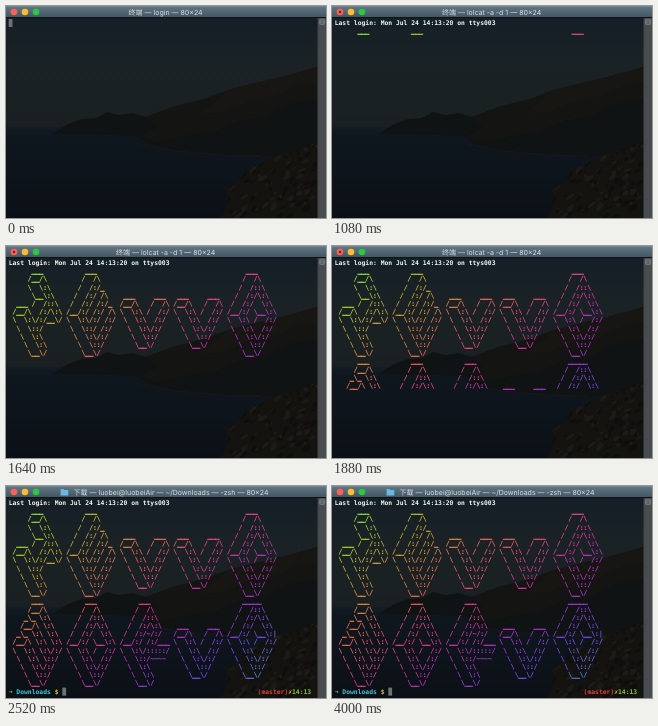
An HTML page for the animation above (4480 ms loop, 320 px wide and 212 px high).

```html
<!DOCTYPE html>
<html lang="zh">
<head>
<meta charset="utf-8">
<title>Terminal</title>
<style>
  html, body { margin: 0; width: 100%; height: 100%; overflow: hidden; background: #0d1218; }
  svg { display: block; width: 100%; height: 100%; }
  text { white-space: pre; text-rendering: geometricPrecision; }
  .mono { font: bold 6.36px "DejaVu Sans Mono", monospace; }
  .art { font-size: 7.1px; text-anchor: middle; }
  .title { font: 7px Inter, "Noto Sans CJK SC", "Noto Sans CJK", sans-serif; fill: #dce1e4; text-anchor: middle; }
</style>
</head>
<body>
<svg viewBox="0 0 320 212">
  <defs>
    <linearGradient id="sky" x2="0" y2="1">
      <stop offset="0" stop-color="#141f26"/>
      <stop offset=".4" stop-color="#1a2225"/>
      <stop offset="1" stop-color="#1a2022"/>
    </linearGradient>
    <linearGradient id="sea" x2="0" y2="1">
      <stop offset="0" stop-color="#131d25"/>
      <stop offset=".1" stop-color="#0f171e"/>
      <stop offset="1" stop-color="#0b1016"/>
    </linearGradient>
    <linearGradient id="bar" x2="0" y2="1">
      <stop offset="0" stop-color="#617786"/>
      <stop offset="1" stop-color="#435561"/>
    </linearGradient>
    <clipPath id="rock">
      <path d="M216 212 222 196 220 184 233 174 240 164 252 160 265 151 286 146 300 139 312 136V212Z"/>
    </clipPath>
  </defs>

  <g id="desktop">
    <rect y="11" width="320" height="111" fill="url(#sky)"/>
    <rect y="121" width="320" height="91" fill="url(#sea)"/>
    <path d="M46 128 62 118 76 113 90 112 101 106 112 109 127 107 140 111 166 101 198 93 222 84 250 77 276 71 312 61V152L262 150 215 149 170 145 142 138 134 131 108 129Z" fill="#101313"/>
    <path d="M140 111 166 101 198 93 222 84 250 77 276 71 312 61V92L280 99 256 111 232 115 206 126 178 130 150 136 134 131 152 121Z" fill="#141513"/>
    <path d="M222 84 250 77 276 71 312 61V76L290 80 268 91 240 96 216 106 194 108Z" fill="#171613"/>
    <path d="M136 138 170 145 215 149 255 150" fill="none" stroke="#1a1814" stroke-width="1.2"/>
    <g id="boulder" clip-path="url(#rock)">
      <rect x="210" y="130" width="102" height="82" fill="#151310"/>
    </g>
  </g>

  <rect x="311.5" y="12" width="8.5" height="200" fill="#484c4e"/>
  <rect x="311.5" y="12" width=".6" height="200" fill="#2d3133"/>
  <path d="M313.8 13.8h4.4v4.4h-4.4ZM313.8 16h4.4" fill="none" stroke="#a5a9ab" stroke-width=".6"/>

  <rect width="320" height="11.4" fill="url(#bar)"/>
  <rect width="320" height=".6" fill="#8296a2"/>
  <rect y="11.1" width="320" height=".9" fill="#0c1115"/>
  <circle cx="8" cy="6" r="3.3" fill="#ff5f57"/>
  <circle id="busy" cx="8" cy="6" r="1.2" fill="#7d1712"/>
  <circle cx="19" cy="6" r="3.3" fill="#ffbd2e"/>
  <circle cx="30" cy="6" r="3.3" fill="#28c840"/>
  <path id="folder" d="M54.6 3h2.8l.8 1H62.3v5.4H54.6Z" fill="#67b8e2"/>
  <text id="title" class="title" y="8.6"></text>

  <g id="screen" class="mono">
    <rect id="cursor" width="3.8" height="8" fill="#6c7274"/>
  </g>
</svg>

<script>
const LOOP = 4480;
const CELL = { w: 3.829, h: 8.2, x: 2.7, y: 19 };
const ART_START = 1080, LINE_MS = 55;
const PROMPT_AT = 2480;

const $ = id => document.getElementById(id);
const raw = s => String.raw(s).split('\n').slice(1);

const FONT = {
  H: raw`
      ___
     /__/\
     \  \:\
      \__\:\
  ___ /  /::\
 /__/\  /:/\:\
 \  \:\/:/__\/
  \  \::/
   \  \:\
    \  \:\
     \__\/`,
  E: raw`
      ___
     /  /\
    /  /:/_
   /  /:/ /\
  /  /:/ /:/_
 /__/:/ /:/ /\
 \  \:\/:/ /:/
  \  \::/ /:/
   \  \:\/:/
    \  \::/
     \__\/`,
  L: raw`



  ___     ___
 /__/\   /  /\
 \  \:\ /  /:/
  \  \:\  /:/
   \  \:\/:/
    \  \::/
     \__\/
`,
  O: raw`
      ___
     /  /\
    /  /::\
   /  /:/\:\
  /  /:/  \:\
 /__/:/ \__\:\
 \  \:\ /  /:/
  \  \:\  /:/
   \  \:\/:/
    \  \::/
     \__\/`,
  W: raw`
      ___
     /__/\
    _\_ \:\
   /__/\ \:\
  _\_ \:\ \:\
 /__/\ \:\ \:\
 \  \:\ \:\/:/
  \  \:\ \::/
   \  \:\/:/
    \  \::/
     \__\/`,
  R: raw`
      ___
     /  /\
    /  /::\
   /  /:/\:\
  /  /:/~/:/
 /__/:/ /:/___
 \  \:\/:::::/
  \  \::/~~~~
   \  \:\
    \  \:\
     \__\/`,
  D: raw`
     _____
    /  /::\
   /  /:/\:\
  /  /:/  \:\
 /__/:/ \__\:|
 \  \:\ /  /:/
  \  \:\  /:/
   \  \:\/:/
    \  \::/
     \__\/
`
};

const banner = word => Array.from({ length: 11 }, (_, i) =>
  [...word].map(c => FONT[c][i].padEnd(14)).join(''));

function add(parent, name, attrs, content = '') {
  const el = document.createElementNS('http://www.w3.org/2000/svg', name);
  for (const k in attrs) el.setAttribute(k, attrs[k]);
  el.textContent = content;
  parent.appendChild(el);
  return el;
}

const colX = col => CELL.x + col * CELL.w;
const rowY = row => CELL.y + row * CELL.h;

function print(parent, row, col, str, fill) {
  return add(parent, 'text', { x: colX(col), y: rowY(row), fill }, str);
}

// Soft sine rainbow running along columns and down rows.
function rainbow(row, col) {
  const phase = -0.2 + 0.1 * (row + col / 3);
  const rgb = [0, 1, 2].map(i =>
    Math.round(Math.sin(phase + i * 2 * Math.PI / 3) * 100 + 152));
  return `rgb(${rgb})`;
}

// Rough light and dark flecks on the boulder.
let seed = 7;
const rand = () => (seed = seed * 16807 % 2147483647) / 2147483647;
for (let i = 0; i < 150; i++) {
  const x = 214 + rand() * 98, y = 134 + rand() * 78;
  add($('boulder'), 'ellipse', {
    rx: 1 + rand() * 4, ry: 0.6 + rand() * 1.6,
    fill: rand() < 0.5 ? '#1e1b16' : '#0e0e0c',
    transform: `translate(${x} ${y}) rotate(${-20 - rand() * 40})`
  });
}

const screen = $('screen');
const login = print(screen, 0, 0, 'Last login: Mon Jul 24 14:13:20 on ttys003', '#f4f6f6');

const lines = [...banner('HELLO'), ...banner('WORLD')].map((line, row) => {
  const g = add(screen, 'g', { class: 'art' });
  [...line].forEach((c, col) => {
    if (c === ' ') return;
    const fill = rainbow(row, col);
    const el = print(g, row + 1, col + 0.5, c, fill);
    if (c === '_') {
      el.setAttribute('stroke', fill);
      el.setAttribute('stroke-width', 0.3);
    }
  });
  return g;
});

const prompt = add(screen, 'g', {});
[
  [0, '➜', '#5fc46a'], [2, 'Downloads', '#45c4d6'], [12, '$', '#d0bd3c'],
  [65, '(master)', '#d8433a'], [73, '✗', '#d9c83c'], [74, '14:13', '#86c23c']
].forEach(([col, str, fill]) => print(prompt, 23, col, str, fill));

const TITLES = [
  [0, '终端 — login — 80×24'],
  [600, '终端 — -zsh — 80×24'],
  [720, '终端 — lolcat -a -d 1 — 80×24'],
  [2320, '终端 — -zsh — 80×24'],
  [2400, '下载 — luobei@luobeiAir — ~/Downloads — -zsh — 80×24']
];

const show = (el, on) => el.setAttribute('visibility', on ? 'visible' : 'hidden');

function placeCursor(row, col) {
  $('cursor').setAttribute('x', colX(col));
  $('cursor').setAttribute('y', rowY(row) - 6);
}

function render(t) {
  const title = TITLES.filter(([at]) => t >= at).pop()[1];
  const inFolder = title.startsWith('下载');
  if ($('title').textContent !== title) $('title').textContent = title;
  $('title').setAttribute('x', inFolder ? 165 : 159.6);
  show($('folder'), inFolder);
  show($('busy'), title.includes('lolcat'));

  show(login, t >= 480);
  const count = t < ART_START ? 0 : Math.floor(1 + (t - ART_START) / LINE_MS);
  lines.forEach((g, i) => show(g, i < count));

  show(prompt, t >= PROMPT_AT);
  show($('cursor'), t < 840 || t >= PROMPT_AT);
  if (t >= PROMPT_AT) placeCursor(23, 14);
  else placeCursor(t < 480 ? 0 : 1, 0);
}

const start = performance.now();
function tick() {
  render((performance.now() - start) % LOOP);
  requestAnimationFrame(tick);
}
tick();
</script>
</body>
</html>
```
